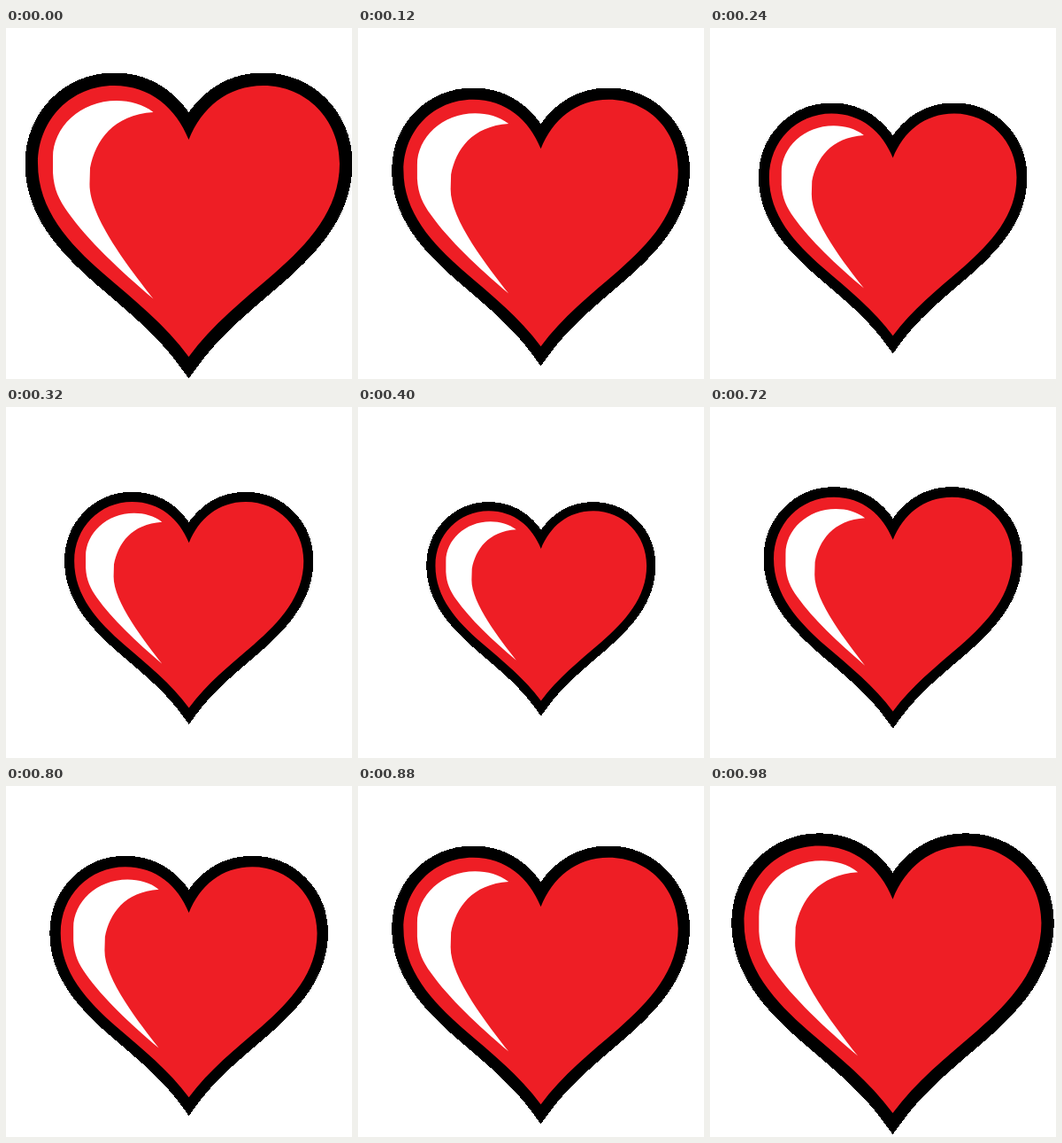
Animation of 391 by 396 pixels, one loop 1 s. Source, as an HTML page:

```html
<!DOCTYPE html>
<html lang="en">
<head>
<meta charset="utf-8">
<title>Beating heart</title>
<style>
  html, body { margin: 0; width: 100%; height: 100%; overflow: hidden; background: #fff; }
  svg { display: block; width: 100%; height: 100%; }
</style>
</head>
<body>
<svg viewBox="0 0 391 396">
  <defs>
    <path id="shape" d="M206.5 126 C192 90 163 65 122 65 C74 65 36 103 36 153
      C36 205 71 243 110 277 C145 307 180 335 206.5 371
      C233 335 268 307 303 277 C342 243 377 205 377 153
      C377 103 339 65 291 65 C250 65 221 90 206.5 126 Z"/>
  </defs>
  <g id="heart">
    <use href="#shape" stroke="#000" stroke-width="29" stroke-linejoin="miter" shape-rendering="crispEdges"/>
    <use href="#shape" fill="#ee1e25"/>
    <path fill="#fff" d="M166.5 95 C155 86 140 82 125 82 C84 82 53 112 53 146
      L53 163 C54 182 60 194 70 208 C92 239 128 273 166.5 305.5
      C142 274 94 214 94.5 176 L95 158 C101 127 121 98 166.5 95 Z"/>
  </g>
</svg>
<script>
  const LOOP = 1000, STEP = 20, MIN = 0.625;
  const CX = 207.5, CY = 239.5;
  const heart = document.getElementById('heart');

  // Shrinks linearly for half the loop, then grows back, in 20 ms steps.
  function draw(ms) {
    const t = Math.floor((ms % LOOP) / STEP) * STEP / LOOP;
    const s = MIN + (1 - MIN) * Math.abs(1 - 2 * t);
    heart.setAttribute('transform', `translate(${CX} ${CY}) scale(${s}) translate(${-CX} ${-CY})`);
  }

  let start;
  function tick(now) {
    start ??= now;
    draw(now - start);
    requestAnimationFrame(tick);
  }
  draw(0);
  requestAnimationFrame(tick);
</script>
</body>
</html>
```
